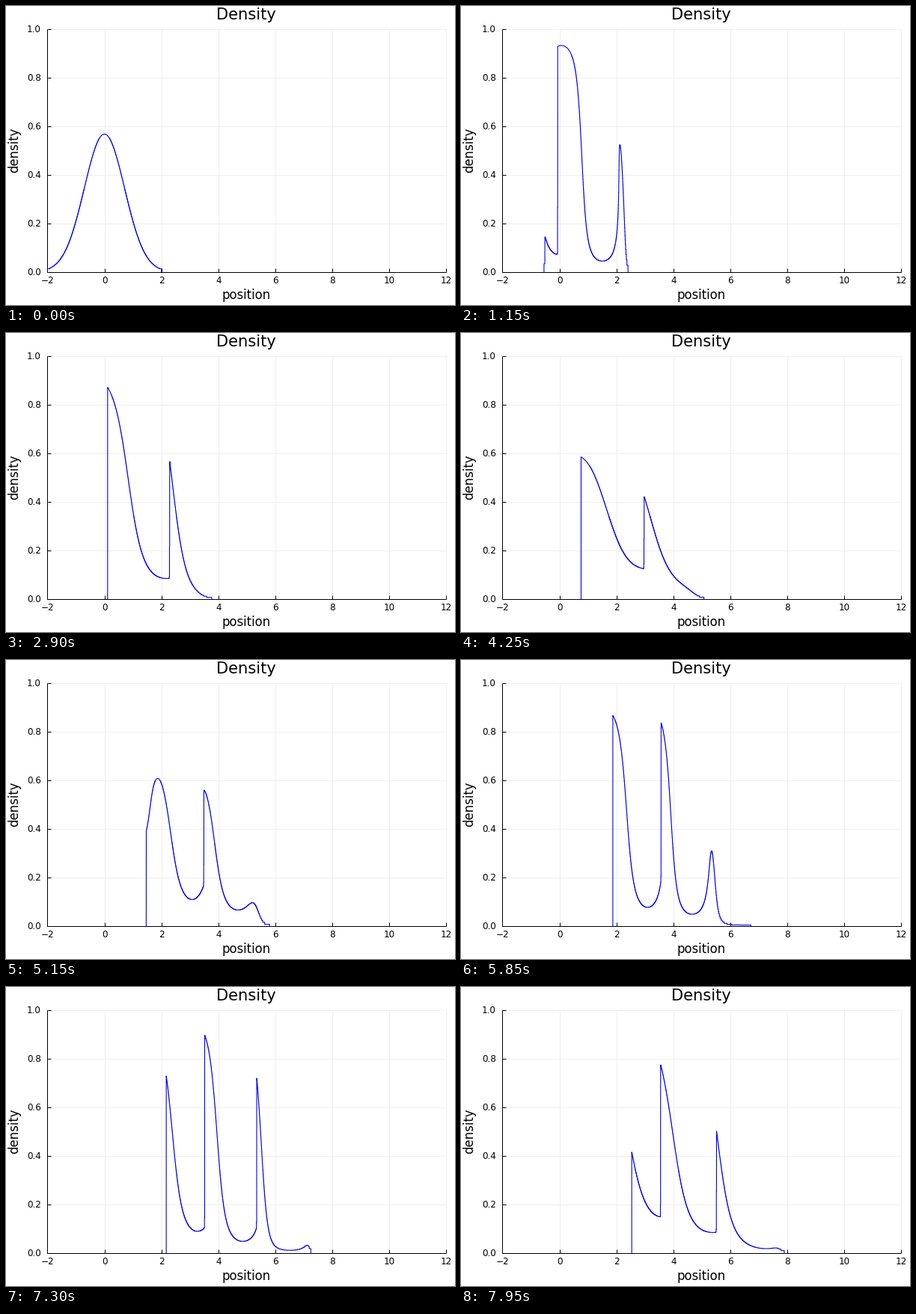
Write a matplotlib script that moves like this. It is 600 by 400 pixels and loops after 8 s.

```python
import numpy as np
import matplotlib.pyplot as plt
from matplotlib.animation import FuncAnimation

W, H, DPI = 600, 400, 100
FRAMES, STEP_MS = 160, 50
CELLS, SUBSTEPS = 1000, 240
LEFT, RIGHT, TOP, BOTTOM = 55.4, 588.4, 30.5, 355.5


def px(x):
    return LEFT + (np.asarray(x) + 2) * (RIGHT - LEFT) / 14


def py(y):
    return BOTTOM - np.asarray(y) * (BOTTOM - TOP)


def start_positions():
    """Cell borders that split a truncated bell curve into equal masses."""
    x = np.linspace(-2, 2, 40001)
    bell = np.exp(-x**2)
    mass = np.concatenate([[0], np.cumsum((bell[1:] + bell[:-1]) / 2)])
    return np.interp(np.linspace(0, mass[-1], CELLS + 1), mass, x)


def simulate():
    """Follow-the-leader traffic; one row of positions per frame.

    Everyone is drawn towards the crowd, so the rear is faster than the
    front, and periodic bottlenecks open and close.
    """
    x = start_positions()
    pull = 1.28 + 0.28 * np.linspace(1, -1, CELLS + 1)
    dt = STEP_MS / 1000 / SUBSTEPS
    rows = [x.copy()]
    for n in range((FRAMES - 1) * SUBSTEPS):
        gate = 0.39 + 0.49 * np.cos(1.25 * (n * dt - 1.17))
        v = pull + gate * np.cos(4 * x)
        v[:-1] *= np.maximum(0, 1 - 1 / (CELLS * np.diff(x)))
        x = x + dt * v
        if (n + 1) % SUBSTEPS == 0:
            rows.append(x.copy())
    return rows


def outline(x):
    rho = 1 / (CELLS * np.diff(x))
    steps = np.concatenate([[0], np.repeat(rho, 2), [0]])
    return px(np.repeat(x, 2)), py(steps)


def size(pixels):
    return pixels * 72 / DPI


fig = plt.figure(figsize=(W / DPI, H / DPI), dpi=DPI, facecolor="white")
ax = fig.add_axes([0, 0, 1, 1])
ax.set_xlim(0, W)
ax.set_ylim(H, 0)
ax.axis("off")


def rule(xs, ys, color="black", z=2):
    ax.plot(xs, ys, color=color, lw=size(1), zorder=z, solid_capstyle="butt")


def label(x, y, text, pixels, **kw):
    ax.text(x, y, text, fontsize=size(pixels), family="DejaVu Sans",
            va="baseline", **kw)


for k in range(-2, 13, 2):
    x = px(k)
    rule([x, x], [TOP, BOTTOM], "#efefef", 1)
    rule([x, x], [BOTTOM, BOTTOM - 5])
    label(x, 371, str(k).replace("-", "\u2212"), 12, ha="center")
for k in range(6):
    y = py(k / 5)
    rule([LEFT, RIGHT], [y, y], "#efefef", 1)
    rule([LEFT, LEFT + 5], [y, y])
    label(47, y + 4.5, f"{k / 5:.1f}", 12, ha="right")
rule([LEFT, LEFT], [TOP, BOTTOM])
rule([LEFT, RIGHT], [BOTTOM, BOTTOM])
label(321, 18, "Density", 21, ha="center")
label(321.5, 392, "position", 16.5, ha="center")
label(16, 193, "density", 16.5, ha="center", rotation=90,
      rotation_mode="anchor")

rows = simulate()
curve, = ax.plot([], [], color="blue", lw=size(1.1), zorder=3)


def draw(n):
    curve.set_data(*outline(rows[n]))
    return curve,


anim = FuncAnimation(fig, draw, frames=FRAMES, interval=STEP_MS,
                     repeat=True, repeat_delay=0, blit=False)
plt.show()
```
